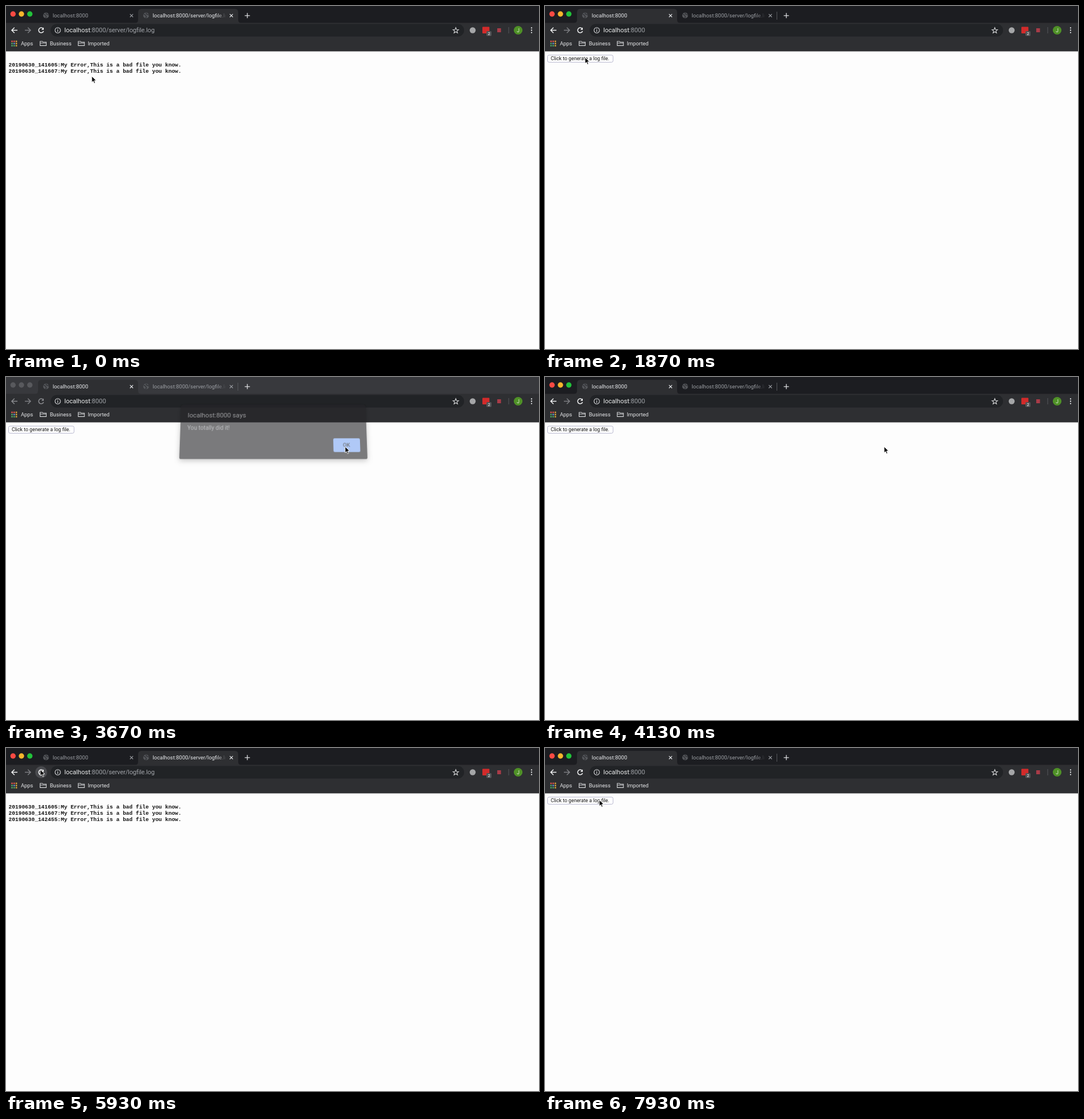
These frames come from a looping animation (932x601 px, 8000 ms). An HTML page:

```html
<!DOCTYPE html>
<html lang="en">
<head>
<meta charset="utf-8">
<title>Log file demo</title>
<style>
  html, body { margin: 0; width: 100%; height: 100%; overflow: hidden; background: #fdfdfd; }
  svg { position: absolute; left: 0; top: 0; display: block; }
  text { white-space: pre; }
  .ui, #dialog { font-family: Roboto, Arial, sans-serif; }
  .tab { font-size: 9.43px; }
  .log { font: 700 9.5px "Liberation Mono", "Courier New", monospace; fill: #111; }
  #dialog {
    position: absolute; left: 302.5px; top: 54px; width: 328.5px; height: 96px;
    background: #222225; border-radius: 3px; transform-origin: 50% 100%;
    box-shadow: 0 0 1px #000, 0 3px 10px rgba(0, 0, 0, .35);
  }
  #dialog div { position: absolute; left: 12.3px; white-space: nowrap; }
  #dialog .title { top: 12px; font-size: 11.7px; line-height: 15px; color: #e4e5e8; }
  #dialog .body { top: 35px; font-size: 10.2px; line-height: 13px; color: #999ba0; }
  #dialog .ok {
    left: 269.5px; top: 60px; width: 47px; height: 23.5px; border-radius: 2.5px;
    background: #7ca7f3; color: #1c2330; font: 500 9.6px/23.5px Roboto, Arial, sans-serif; text-align: center;
  }
</style>
</head>
<body>
<svg class="ui" width="932" height="601" viewBox="0 0 932 601">
  <defs>
    <linearGradient id="fadeOn" gradientUnits="userSpaceOnUse" x1="368" x2="385" y1="0" y2="0">
      <stop offset="0" stop-color="#e8eaed"/><stop offset="1" stop-color="#e8eaed" stop-opacity="0"/>
    </linearGradient>
    <linearGradient id="fadeOff" gradientUnits="userSpaceOnUse" x1="368" x2="385" y1="0" y2="0">
      <stop offset="0" stop-color="#9a9da2"/><stop offset="1" stop-color="#9a9da2" stop-opacity="0"/>
    </linearGradient>
    <clipPath id="tabClip"><rect x="250" y="5" width="135" height="24"/></clipPath>
    <g id="globe">
      <circle r="5.1" fill="#54565a"/>
      <path d="M-4 -2Q-1 -1 0 1T-1 4.5M0 -4.5Q0 -2 2 -2T4.5 0" fill="none" stroke="#303135" stroke-width="1.4"/>
    </g>
    <path id="close" d="M-2.7 -2.7L2.7 2.7M2.7 -2.7L-2.7 2.7" fill="none" stroke-width="1.1"/>
    <path id="folder" d="M.6 8.6V1.2H4.6L5.8 2.5H11.4V8.6ZM.6 4.2H11.4" fill="none" stroke="#d4d5d7" stroke-width="1.1"/>
  </defs>

  <rect width="932" height="601" fill="#fdfdfd"/>
  <rect id="strip" width="932" height="31"/>
  <rect y="29.5" width="932" height="50" fill="#2e2f32"/>
  <path id="tabShape" fill="#2e2f32" d="M50 30Q56 30 56 24V11Q56 5 62 5H225Q231 5 231 11V24Q231 30 237 30Z"/>
  <g id="lights"></g>

  <use href="#globe" x="70" y="16.5"/>
  <text id="tabA" class="tab" x="81.7" y="20">localhost:8000</text>
  <use id="closeA" href="#close" x="219.5" y="16.8"/>
  <use href="#globe" x="245" y="16.5"/>
  <text id="tabB" class="tab" x="256.5" y="20" clip-path="url(#tabClip)">localhost:8000/server/logfile.log</text>
  <use id="closeB" href="#close" x="394" y="16.8"/>
  <path id="split" d="M405.5 10V24" stroke="#55575b"/>
  <path d="M417.5 16.8H426.5M422 12.3V21.3" stroke="#dcdde0" stroke-width="1.3"/>

  <circle id="hover" cx="61.5" cy="42.5" r="10.5" fill="#4a4b4f"/>
  <path id="back" d="M20 42.5H10M14.8 37.7L10 42.5L14.8 47.3" fill="none" stroke-width="1.5"/>
  <path d="M33 42.5H43M38.2 37.7L43 42.5L38.2 47.3" fill="none" stroke="#7d7e82" stroke-width="1.5"/>
  <g id="reload" fill="none" stroke-width="1.5">
    <path d="M64.9 39.6A4.4 4.4 0 1 0 65.7 43.9"/>
    <path d="M66 37.4V41.7H61.8Z" stroke="none"/>
  </g>

  <rect x="78" y="31.5" width="723" height="22" rx="11" fill="#212326"/>
  <circle cx="90.5" cy="42.5" r="4.7" fill="none" stroke="#d8d9db" stroke-width="1.1"/>
  <path d="M90.5 41.8V45.2M90.5 39.6V40.8" stroke="#d8d9db" stroke-width="1.2"/>
  <text x="102" y="46.3" font-size="11.1" fill="#eceded">localhost<tspan fill="#a0a3a8">:8000</tspan></text>
  <text id="path" x="175" y="46.3" font-size="11.1" letter-spacing="-.18" fill="#a0a3a8">/server/logfile.log</text>
  <path id="star" fill="none" stroke="#d4d5d7" stroke-width="1.1"/>

  <circle cx="816" cy="42.5" r="5.2" fill="#a5a6a8"/>
  <rect x="833" y="36.5" width="12.3" height="11.5" rx="1" fill="#d22b2b"/>
  <rect x="840" y="44" width="9" height="8.5" rx="1.5" fill="#505255"/>
  <text x="844.5" y="51" font-size="7.5" text-anchor="middle" fill="#fff">2</text>
  <rect x="859" y="39" width="6.5" height="7" fill="#a83b48"/>
  <path d="M879 37V48" stroke="#55575b"/>
  <circle cx="895.5" cy="42.5" r="7.6" fill="#4f9127"/>
  <text x="895.5" y="45.6" font-size="8.5" text-anchor="middle" fill="#e9f2e4">J</text>
  <path d="M919 38.4V38.41M919 42.5V42.51M919 46.6V46.61" stroke="#e8eaed" stroke-width="2.3" stroke-linecap="round"/>

  <g id="apps"></g>
  <g font-size="9.35" fill="#e6e7e9">
    <text x="26" y="69">Apps</text>
    <use href="#folder" x="59" y="60.8"/><text x="76.7" y="69">Business</text>
    <use href="#folder" x="125.7" y="60.8"/><text x="143" y="69">Imported</text>
  </g>

  <g id="home">
    <rect x="4.5" y="86" width="114.5" height="12.5" rx="2.6" fill="#fff" stroke="#b8b8cf"/>
    <text x="10" y="95.2" font-size="8.76" fill="#161616">Click to generate a log file.</text>
  </g>
  <g id="logs" class="log">
    <text x="4.6" y="105.6">20190630_141605:My Error,This is a bad file you know.</text>
    <text x="4.6" y="116.6">20190630_141607:My Error,This is a bad file you know.</text>
    <text id="newLine" x="4.6" y="127.6">20190630_142455:My Error,This is a bad file you know.</text>
  </g>
</svg>

<div id="dialog">
  <div class="title">localhost:8000 says</div>
  <div class="body">You totally did it!</div>
  <div class="ok">OK</div>
</div>

<svg width="932" height="601" viewBox="0 0 932 601">
  <path id="cursor" d="M0 0V10.8L2.5 8.5L4.2 12.4L6.1 11.6L4.4 7.8H7.9Z" fill="#050505" stroke="#fff" stroke-width=".9"/>
</svg>

<script>
const LOOP = 8000, TICK = 200 / 3;
const $ = id => document.getElementById(id);
const set = (id, name, value) => $(id).setAttribute(name, value);
const show = (id, on) => { $(id).style.display = on ? '' : 'none'; };
const within = (t, a, b) => t >= a && t < b;
const clamp = v => Math.min(1, Math.max(0, v));

// time, x, y of the pointer tip
const POINTER = [
  [0, 150, 123], [70, 150, 123], [520, 146, 17], [1000, 146, 17], [1730, 70, 90],
  [1870, 70, 90], [2390, 72, 90], [2730, 72, 90], [3400, 593, 122], [4380, 593, 122],
  [4690, 310, 17], [4740, 310, 17], [4930, 157, 17], [5480, 60, 38], [5950, 60, 38],
  [6230, 118, 123], [6400, 118, 123], [6780, 125, 17], [7070, 125, 17], [7750, 95, 91], [8000, 95, 91]
];
const LIGHTS = ['#f94a43', '#f7b52c', '#22c23a'];
const APPS = ['#e2574c', '#e2574c', '#d8a53a', '#52a866', '#5d8fd8', '#d8a53a', '#52a866', '#52a866', '#d8a53a'];

$('lights').innerHTML = LIGHTS.map((c, i) => `<circle cx="${12.3 + i * 14.7}" cy="14" r="4.7"/>`).join('');
$('apps').innerHTML = APPS.map((c, i) =>
  `<rect x="${9.3 + i % 3 * 3.8}" y="${60.7 + Math.floor(i / 3) * 3.8}" width="2.5" height="2.5" fill="${c}"/>`).join('');
set('star', 'd', 'M' + Array.from({ length: 10 }, (_, i) => {
  const r = i % 2 ? 2.2 : 5.2, a = i * Math.PI / 5;
  return (786.5 + r * Math.sin(a)).toFixed(2) + ' ' + (43 - r * Math.cos(a)).toFixed(2);
}).join('L') + 'Z');

function pointerAt(t) {
  const i = Math.max(1, POINTER.findIndex(k => k[0] > t));
  const [t0, x0, y0] = POINTER[i - 1], [t1, x1, y1] = POINTER[i];
  const p = (1 - Math.cos(Math.PI * clamp((t - t0) / (t1 - t0)))) / 2;
  return [x0 + (x1 - x0) * p, y0 + (y1 - y0) * p];
}

// away: 0 is fully open, 1 is gone; the top edge tilts back as it leaves
function drawDialog(away) {
  const s = $('dialog').style;
  show('dialog', away < 1);
  s.opacity = 1 - away;
  s.transform = away > 0
    ? `matrix3d(1,0,0,0, 0,${1 + .04 * away},0,${-.00056 * away}, 0,0,1,0, 0,${-16 * away},0,1)`
    : 'none';
}

function draw(t) {
  const home = within(t, 595, 4720) || t >= 6860;
  const blurred = within(t, 1925, 3790) || t >= 7925;
  const modal = within(t, 1990, 3790);
  const bright = '#e8eaed', dim = '#9a9da2';

  set('strip', 'fill', modal ? '#38393d' : '#1c1d21');
  set('tabShape', 'transform', `translate(${home ? 0 : 175})`);
  [...$('lights').children].forEach((c, i) => c.setAttribute('fill', blurred ? '#58595d' : LIGHTS[i]));
  set('tabA', 'fill', home ? bright : dim);
  set('closeA', 'stroke', home ? bright : dim);
  set('tabB', 'fill', home ? 'url(#fadeOff)' : 'url(#fadeOn)');
  set('closeB', 'stroke', home ? dim : bright);
  show('split', home);
  show('path', !home);
  show('home', home);
  show('logs', !home);
  show('newLine', t >= 5790);

  const nav = modal ? '#8a8b8f' : '#f0f1f2';
  set('back', 'stroke', nav);
  set('reload', 'stroke', nav);
  set('reload', 'fill', 'none');
  $('reload').lastElementChild.setAttribute('fill', nav);

  const [x, y] = pointerAt(t);
  show('hover', Math.hypot(x - 61.5, y - 42.5) < 10.5);
  set('cursor', 'transform', `translate(${x.toFixed(1)} ${y.toFixed(1)})`);

  drawDialog(t < 2800 ? 1 - clamp((t - 1950) / 180) : clamp((t - 3595) / 180));
}

const start = performance.now();
function frame() {
  const t = (performance.now() - start) % LOOP;
  draw(Math.floor(t / TICK) * TICK);
  requestAnimationFrame(frame);
}
draw(0);
requestAnimationFrame(frame);
</script>
</body>
</html>
```
